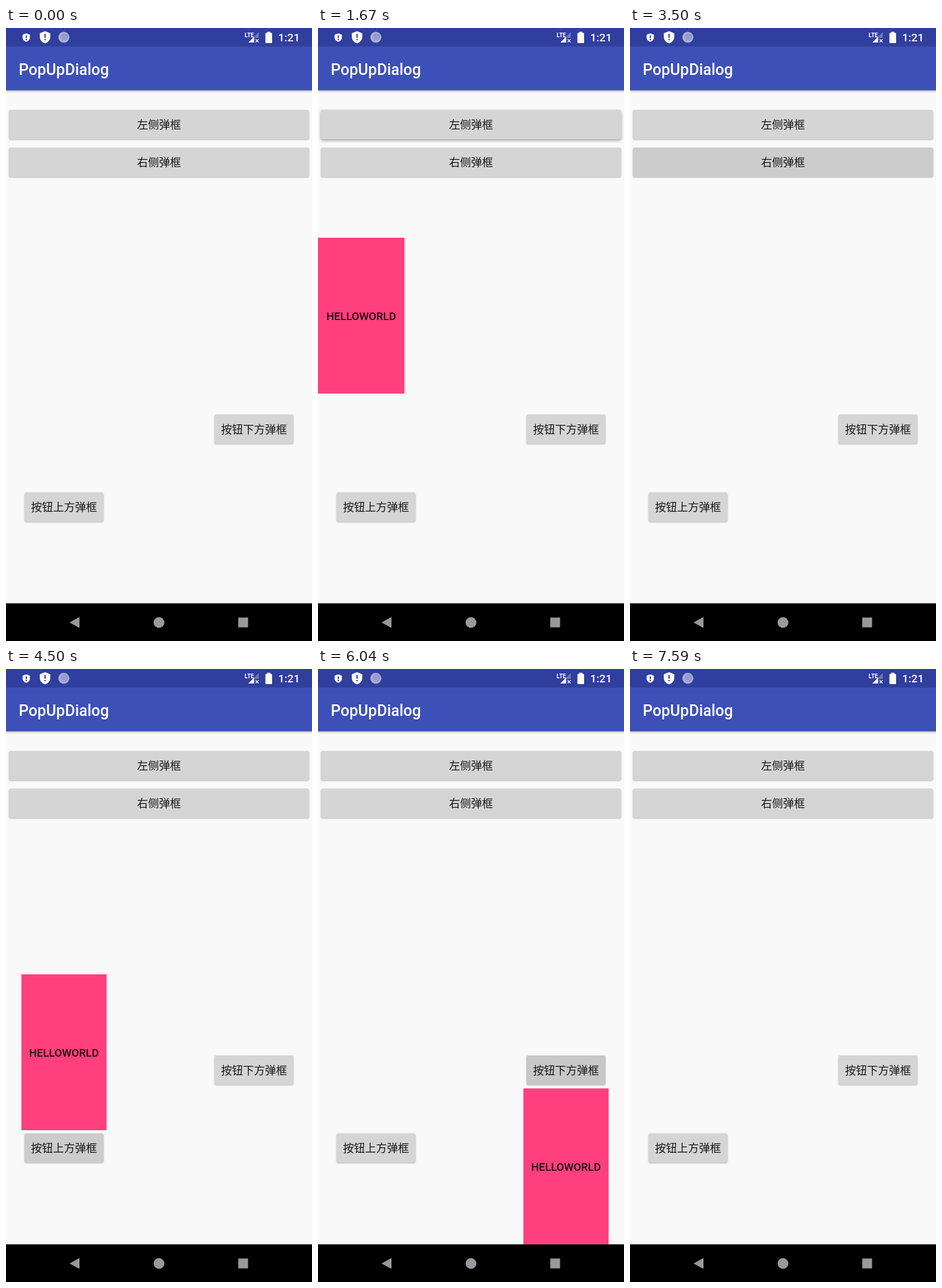
Write an HTML page that moves like this. It is 529x1058 px and loops after 7.64 s.

```html
<!DOCTYPE html>
<html lang="zh-CN">
<head>
<meta charset="utf-8">
<title>PopUpDialog</title>
<style>
  html, body { margin: 0; width: 100%; height: 100%; overflow: hidden; background: #f9f9f9; }
  svg { display: block; width: 100vw; height: 100vh; }
  text { font-family: Roboto, "Noto Sans CJK SC", "Noto Sans CJK", sans-serif; }
  .label { font-family: "Noto Sans CJK SC", "Noto Sans CJK", sans-serif; font-size: 19px; text-anchor: middle; fill: #161616; }
  .hello { font-size: 18.83px; font-weight: 500; text-anchor: middle; fill: #1a0d12; }
</style>
</head>
<body>
<svg id="stage" viewBox="0 0 529 1058" xmlns="http://www.w3.org/2000/svg">
  <defs>
    <linearGradient id="barShadow" x2="0" y2="1">
      <stop offset="0" stop-opacity=".32"/>
      <stop offset=".4" stop-opacity=".1"/>
      <stop offset="1" stop-opacity="0"/>
    </linearGradient>
    <path id="shield" d="M0-10.5 9-7V0C9 5 5 9 0 10.5-5 9-9 5-9 0V-7Z"/>
  </defs>
  <rect width="529" height="1058" fill="#f9f9f9"/>

  <rect y="107" width="529" height="6" fill="url(#barShadow)"/>
  <rect y="32" width="529" height="75.5" fill="#3d50b7"/>
  <rect width="529" height="32" fill="#303e9d"/>
  <text x="22" y="81" font-size="26.8" font-weight="500" fill="#fff">PopUpDialog</text>

  <g fill="#fff">
    <g transform="translate(35 16.5) scale(.7)">
      <use href="#shield"/>
      <path d="M-1.5-5h3v6h-3zM-1.5 3h3v3h-3z" fill="#303e9d"/>
    </g>
    <g transform="translate(67.5 16)">
      <use href="#shield"/>
      <path d="M-1.1-6h2.2v7h-2.2zM-1.1 3h2.2v2.2h-2.2z" fill="#303e9d"/>
    </g>
    <circle cx="100" cy="16" r="8.7" fill="#a4abd6" stroke="#c9cde8" stroke-width="1.6" stroke-dasharray="1.5 1"/>
    <circle cx="101.5" cy="15" r="6.3" fill="#969cce"/>
    <text x="412.5" y="15.5" font-size="10" font-weight="700">LTE</text>
    <path d="M437 7V17H429V25H419Z" opacity=".3"/>
    <path d="M429 15V25H419Z"/>
    <path d="M431.5 19.5l5 5m0-5l-5 5" stroke="#fff" stroke-width="1.5"/>
    <path d="M451.5 8.5V6.5h5.5v2h2a1 1 0 0 1 1 1V25a1 1 0 0 1-1 1h-9.5a1 1 0 0 1-1-1V9.5a1 1 0 0 1 1-1Z"/>
    <text x="470.5" y="23.3" font-size="19" font-weight="500">1:21</text>
  </g>

  <g id="buttons"></g>
  <g id="panels"></g>

  <rect y="993" width="529" height="65"/>
  <g fill="#99989d">
    <path d="M110 1026L127 1016.5V1035.5Z"/>
    <circle cx="264.5" cy="1026" r="9.3"/>
    <rect x="401.5" y="1017.5" width="17" height="17"/>
  </g>
</svg>
<script>
  const LOOP = 7640;
  const PANEL_H = 269, SLIDE_W = 149.5, SLIDE_Y = 362, DROP_W = 147.3;
  const MOVE_TIME = 120;
  const NS = "http://www.w3.org/2000/svg";

  const clamp = v => Math.max(0, Math.min(1, v));
  const ramp = (t, from, duration) => clamp((t - from) / duration);
  const easeInOut = p => (1 - Math.cos(Math.PI * p)) / 2;

  function add(parent, tag, attrs, text) {
    const el = document.createElementNS(NS, tag);
    set(el, attrs);
    if (text) el.textContent = text;
    return parent.appendChild(el);
  }
  function set(el, attrs) {
    for (const key in attrs) el.setAttribute(key, attrs[key]);
  }

  const defs = document.querySelector("defs");
  const buttonLayer = document.getElementById("buttons");
  const panelLayer = document.getElementById("panels");

  // presses: touch times on the button; touchX: ripple centre
  const buttons = [
    { label: "左侧弹框", x: 5, y: 141.5, w: 519, touchX: 231, presses: [830, 1590] },
    { label: "右侧弹框", x: 5, y: 206.5, w: 519, touchX: 231, presses: [2420, 3100] },
    { label: "按钮下方弹框", x: 360.5, y: 667, w: 136.5, touchX: 429, presses: [5730] },
    { label: "按钮上方弹框", x: 32, y: 801.5, w: 136.5, touchX: 100, presses: [4090, 4680] }
  ];

  // slide: side the panel leaves to; pivot: 0 grows down, 1 grows up
  const panels = [
    { x: 0, y: SLIDE_Y, w: SLIDE_W, open: 934, close: 1690, slide: -1 },
    { x: 529 - SLIDE_W, y: SLIDE_Y, w: SLIDE_W, open: 2524, close: 3200, slide: 1 },
    { x: 26.6, y: 527, w: DROP_W, open: 4194, close: 4780, pivot: 1 },
    { x: 355.1, y: 723.8, w: DROP_W, open: 5834, close: 6440, pivot: 0 }
  ];

  buttons.forEach((b, i) => {
    const box = { x: b.x, y: b.y, width: b.w, height: 50.5, rx: 3 };
    const clip = add(defs, "clipPath", { id: "clip" + i });
    add(clip, "rect", box);
    b.face = add(buttonLayer, "rect", { ...box, fill: "#d4d5d4" });
    b.tint = add(buttonLayer, "rect", box);
    const clipped = add(buttonLayer, "g", { "clip-path": `url(#clip${i})` });
    b.ripple = add(clipped, "circle", { cx: b.touchX, cy: b.y + 25.5 });
    add(buttonLayer, "text", { class: "label", x: b.x + b.w / 2, y: b.y + 32.7 }, b.label);
  });

  for (const p of panels) {
    p.group = add(panelLayer, "g", {});
    add(p.group, "rect", { width: p.w, height: PANEL_H, fill: "#ff3f7e" });
    add(p.group, "text", { class: "hello", x: p.w / 2, y: 142 }, "HELLOWORLD");
  }

  function drawButton(b, t) {
    const last = b.presses.filter(press => press <= t).pop();
    const age = last === undefined ? 1e4 : t - last;
    const fade = 1 - ramp(age, 230, 300);
    const lift = ramp(age, 0, 80) * (1 - ramp(age, 130, 80));
    b.face.style.filter =
      `drop-shadow(0 ${1.2 + lift}px ${1.2 + 1.2 * lift}px rgba(0,0,0,${0.28 + 0.1 * lift}))`;
    set(b.tint, { opacity: 0.055 * ramp(age, 90, 80) * fade });
    set(b.ripple, { r: 320 * ramp(age, 100, 300) ** 1.3, opacity: 0.045 * fade });
  }

  function drawPanel(p, t) {
    const shown = easeInOut(ramp(t, p.open, MOVE_TIME)) - easeInOut(ramp(t, p.close, MOVE_TIME));
    p.group.style.display = shown > 0 ? "" : "none";
    if (shown <= 0) return;
    if (p.slide) {
      set(p.group, { transform: `translate(${p.x + p.slide * p.w * (1 - shown)} ${p.y})` });
    } else {
      const y = p.y + PANEL_H * (1 - shown) * p.pivot;
      set(p.group, { transform: `translate(${p.x} ${y}) scale(1 ${shown})`, opacity: shown });
    }
  }

  function draw(t) {
    buttons.forEach(b => drawButton(b, t));
    panels.forEach(p => drawPanel(p, t));
  }

  const start = performance.now();
  function tick() {
    draw((performance.now() - start) % LOOP);
    requestAnimationFrame(tick);
  }
  draw(0);
  requestAnimationFrame(tick);
</script>
</body>
</html>
```
